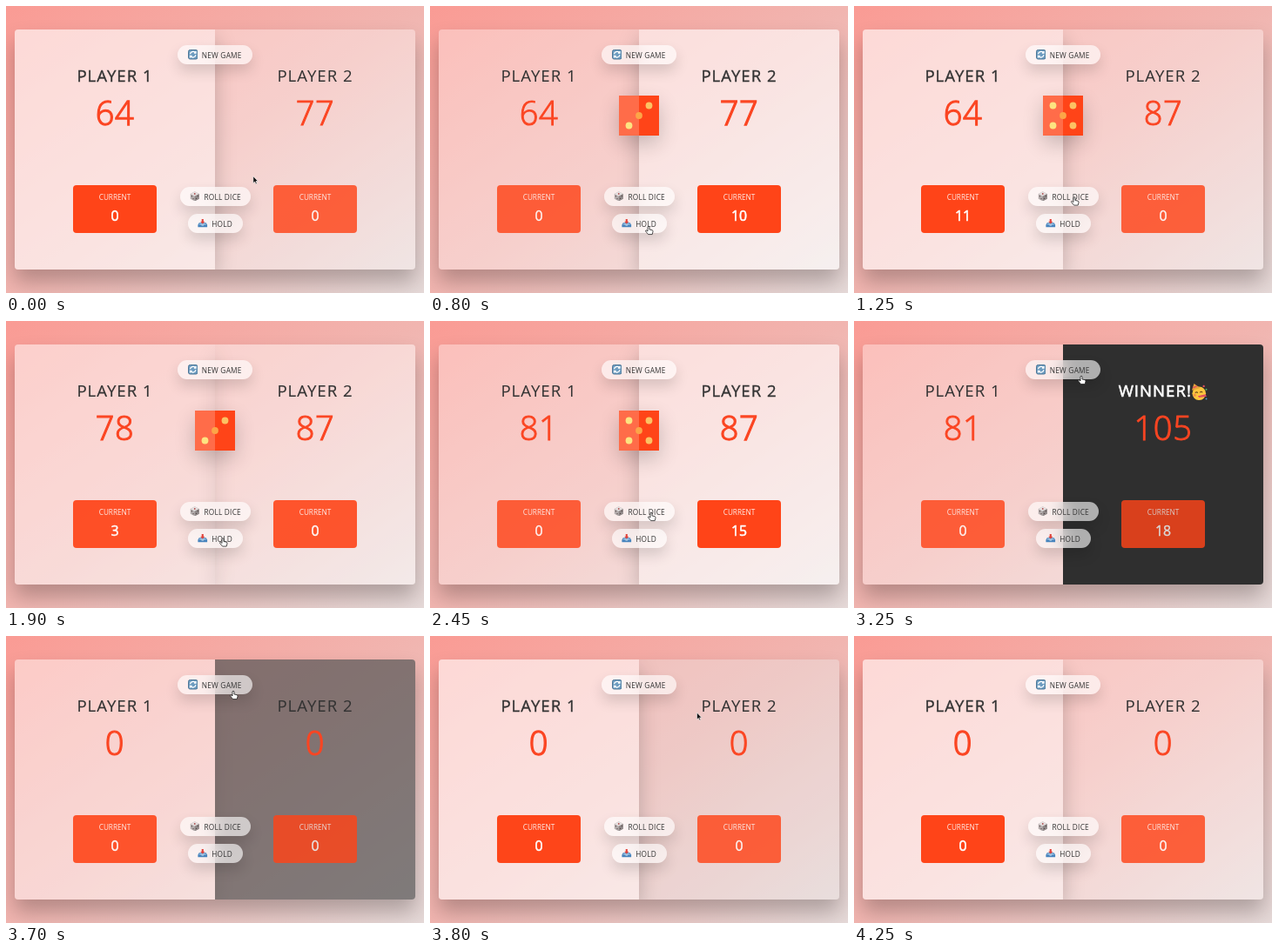
These frames come from a looping animation (480x330 px, 4300 ms). An HTML page:

```html
<!DOCTYPE html>
<html lang="en">
<head>
<meta charset="utf-8">
<title>Dice game</title>
<style>
html, body { margin: 0; width: 100%; height: 100%; overflow: hidden; }
body {
  position: relative;
  background: linear-gradient(to top left, #e6dad9, #f1b5b0 50%, #fa9b94);
  font-family: "Open Sans", "Noto Sans", sans-serif;
  color: #333;
}
div, .abs { position: absolute; box-sizing: border-box; white-space: nowrap; }
#board, #shade { left: 10px; top: 27px; width: 460px; height: 276px; border-radius: 4px; }
#board { overflow: hidden; background: rgba(255, 255, 255, .35); }
#shade { box-shadow: 0 14px 23px rgba(0, 0, 0, .25); }
.player { top: 0; width: 230px; height: 276px; text-align: center; }
.dark { inset: 0; background: #2f2f2f; }
.name, .score, .label, .value { left: 0; width: 100%; }
.name { top: 38px; line-height: 30px; font-size: 18.6px; letter-spacing: 1px; }
.name svg { width: 19.5px; height: 19.5px; margin-left: -1px; vertical-align: -4px; }
.score { top: 64.5px; line-height: 60px; font-size: 38px; letter-spacing: .6px; color: #fb4522; font-weight: 300; }
.box {
  left: 67px; top: 179px; width: 96px; height: 55px;
  border-radius: 4px; background: #ff4418; color: #fff;
}
.label { top: 4px; line-height: 20px; font-size: 8.2px; opacity: .9; }
.value { top: 20px; line-height: 30px; font-size: 15.8px; }
.btn {
  height: 22px; border-radius: 11px; line-height: 23.2px; font-size: 8.3px; letter-spacing: .22px;
  background: rgba(255, 255, 255, .62); backdrop-filter: blur(9px);
  box-shadow: 0 8px 16px rgba(0, 0, 0, .14);
}
.btn svg { position: absolute; left: 11.5px; top: 5px; width: 11.5px; height: 11.5px; }
.btn span { position: absolute; left: 27.6px; }
#die { left: 217px; top: 102.7px; width: 46px; height: 46px; box-shadow: 0 9px 23px rgba(0, 0, 0, .2); }
#cursor { left: 0; top: 0; overflow: visible; }
</style>
</head>
<body>
<div id="shade"></div>
<div id="board"></div>
<svg id="die" class="abs" viewBox="0 0 46 46"></svg>
<div class="btn" style="left:197.2px;top:45px;width:86px">
  <svg viewBox="0 0 12 12"><rect x=".5" y=".5" width="11" height="11" rx="2" fill="#6d9cc0" stroke="#4a7594"/>
    <path d="M2.7 5.5a3.4 3 0 0 1 6.3-1.5M9.3 6.5a3.4 3 0 0 1-6.3 1.5M9.4 2.2v2.2H7.2M2.6 9.8V7.6h2.2" fill="none" stroke="#fff" stroke-width="1.3"/></svg>
  <span>NEW GAME</span></div>
<div class="btn" style="left:199.8px;top:207.8px;width:81.2px">
  <svg viewBox="0 0 12 12"><path d="M6 .3l5.2 2.7v6.2L6 11.9.8 9.2V3z" fill="#b3acac"/>
    <path d="M6 .3L11.2 3 6 5.9.8 3z" fill="#e6e0e0"/><path d="M6 5.9L11.2 3v6.2L6 11.9z" fill="#8f8888"/>
    <g fill="#544"><circle cx="6" cy="3" r=".9" fill="#a44"/><circle cx="2.5" cy="5.9" r=".7"/><circle cx="4.2" cy="9" r=".7"/><circle cx="7.8" cy="8.8" r=".7"/><circle cx="9.7" cy="5.7" r=".7"/></g></svg>
  <span>ROLL DICE</span></div>
<div class="btn" style="left:208.6px;top:239.2px;width:63.4px">
  <svg viewBox="0 0 12 12"><path d="M1.8 5.6h8.4L11.6 8v2.8H.4V8z" fill="#4583bd"/><path d="M2.4 6.4h7.2l.8 1.4H8L7 9H5L4 7.8H1.6z" fill="#a9c8e2"/>
    <path d="M4.9 1h2.2v2.8h1.6L6 6.8 3.3 3.8h1.6z" fill="#e0413a"/></svg>
  <span>HOLD</span></div>
<svg id="cursor" class="abs" width="12" height="14">
  <path id="arrow" d="M0 0v8l1.9-1.6 1.2 2.7 1.3-.6L3.2 5.9h2.4z" fill="#111" stroke="#fff" stroke-width=".6"/>
  <path id="hand" d="M-1 .8Q0-.6 1 .8V4l3 .6q1.2.4 1 1.8L4.2 9.6h-4.6L-3.4 6q-.2-1.3 1-1.1L-1 6z" fill="#fff" stroke="#222" stroke-width=".8" stroke-linejoin="round"/>
</svg>
<script>
const LOOP = 4300, FADE = 200;
const $ = id => document.getElementById(id);
const lerp = (a, b, k) => a + (b - a) * k;

const FACE = `<svg viewBox="0 0 20 20"><circle cx="9.5" cy="11.5" r="8" fill="#fcc63d"/>
  <path d="M1 8L3.5 0 11 5z" fill="#e8a33a"/><path d="M2 5l5-2" stroke="#e04f5f" stroke-width="1.4"/>
  <path d="M5 11q1.5-2 3 0M10.5 10.5q1.5-2 3 0" fill="none" stroke="#5b3a1c" stroke-width="1.2"/>
  <circle cx="4.5" cy="13.5" r="1.6" fill="#f2924a"/><path d="M8 14.5l9-2 1.5 2.5-9 1.5z" fill="#e04f5f"/>
  <circle cx="15" cy="3" r="1.2" fill="#e04f5f"/><circle cx="18" cy="7" r="1" fill="#58b368"/><circle cx="18" cy="18" r="1" fill="#4a9bd4"/></svg>`;

// Time and move: a rolled number, H to hold, N for a new game
const MOVES = [
  [200, 4], [330, 1], [450, 5], [580, 2], [700, 3], [850, 'H'],
  [1010, 6], [1190, 5], [1340, 3], [1500, 'H'],
  [1650, 4], [1833, 1], [1870, 3], [1930, 'H'],
  [2080, 6], [2220, 4], [2370, 5], [2520, 3], [2707, 'H'], [3650, 'N']
];

// Cursor stops: time, x, y
const PATH = [
  [0, 284, 195.5], [180, 254, 219], [720, 254, 219], [790, 251, 253], [880, 251, 253],
  [970, 253, 219.5], [1380, 253, 219.5], [1460, 250, 250], [1530, 250, 250],
  [1610, 252, 219.5], [1870, 252, 219.5], [1898, 249, 249.5], [1950, 249, 249.5],
  [2030, 254, 220], [2590, 254, 220], [2670, 252, 250], [2720, 252, 250],
  [2800, 256, 220.5], [3060, 261, 63], [3740, 261, 63], [4050, 492, 190]
];

const players = [0, 1].map(i => {
  const el = document.createElement('div');
  el.className = 'player';
  el.style.left = i * 230 + 'px';
  el.innerHTML = '<div class="dark"></div><div class="name"></div><div class="score"></div>' +
    '<div class="box"><div class="label">CURRENT</div><div class="value"></div></div>';
  $('board').append(el);
  const part = c => el.querySelector('.' + c);
  return { el, dark: part('dark'), name: part('name'), score: part('score'), box: part('box'), value: part('value') };
});
const buttons = [...document.querySelectorAll('.btn')].map(b =>
  [b.offsetLeft, b.offsetTop, b.offsetWidth, b.offsetHeight]);

// The standard CSS "ease" curve
function ease(x) {
  if (x >= 1) return 1;
  let lo = 0, hi = 1, s;
  for (let i = 0; i < 20; i++) {
    s = (lo + hi) / 2;
    if (.75 * s * (1 - s) + s ** 3 < x) lo = s; else hi = s;
  }
  return .3 * s * (1 - s) ** 2 + 3 * s * s * (1 - s) + s ** 3;
}

const fader = v => ({ from: v, to: v, at: -FADE });
const level = (f, t) => lerp(f.from, f.to, ease((t - f.at) / FADE));
function fadeTo(f, to, t) {
  if (f.to !== to) Object.assign(f, { from: level(f, t), to, at: t });
}

function play(t) {
  const g = {
    score: [64, 77], cur: [0, 0], turn: 0, die: 0, winner: -1,
    active: [fader(1), fader(0)], won: [fader(0), fader(0)]
  };
  for (const [at, move] of MOVES) {
    if (at > t) break;
    const p = g.turn;
    let swap = false;
    if (move === 'N') {
      Object.assign(g, { score: [0, 0], cur: [0, 0], turn: 0, die: 0, winner: -1 });
    } else if (move === 'H') {
      g.score[p] += g.cur[p];
      if (g.score[p] >= 100) { g.winner = p; g.die = 0; }
      else swap = true;
    } else {
      g.die = move;
      g.cur[p] += move;
      swap = move === 1;
    }
    if (swap) { g.cur[p] = 0; g.turn = 1 - p; }
    for (const i of [0, 1]) {
      fadeTo(g.active[i], +(g.turn === i && g.winner < 0), at);
      fadeTo(g.won[i], +(g.winner === i), at);
    }
  }
  return g;
}

function drawDie(n) {
  const pips = [];
  if (n % 2) pips.push([1, 1]);
  if (n > 1) pips.push([0, 2], [2, 0]);
  if (n > 3) pips.push([0, 0], [2, 2]);
  if (n > 5) pips.push([0, 1], [2, 1]);
  $('die').style.display = n ? '' : 'none';
  $('die').innerHTML = '<path d="M0 0h46v46H0z" fill="#ff4418"/><path d="M0 0h23v46H0z" fill="#ff6c49"/>' +
    pips.map(([x, y]) => `<circle cx="${11.5 + x * 11.5}" cy="${11.5 + y * 11.5}" r="3.9" fill="${['#fde481', '#fca548', '#fcc263'][x]}"/>`).join('');
}

function drawCursor(t) {
  let i = PATH.findIndex(p => p[0] > t);
  if (i < 0) i = PATH.length - 1;
  const [t0, x0, y0] = PATH[i - 1], [t1, x1, y1] = PATH[i];
  const k = Math.min(1, (t - t0) / (t1 - t0));
  const x = lerp(x0, x1, k), y = lerp(y0, y1, k);
  const over = buttons.some(([l, top, w, h]) => x > l && x < l + w && y > top && y < top + h);
  $('cursor').style.transform = `translate(${x}px, ${y}px)`;
  $('hand').style.display = over ? '' : 'none';
  $('arrow').style.display = over ? 'none' : '';
}

const stroke = (el, w) => { el.style.webkitTextStroke = w + 'px'; };

let shown = '';
function draw(t) {
  const g = play(t);
  const key = [g.score, g.cur, g.winner, g.die].join();
  players.forEach((p, i) => {
    const a = level(g.active[i], t), won = g.winner === i;
    p.el.style.background = `rgba(255,255,255,${.4 * a})`;
    p.el.style.boxShadow = `0 9px 23px rgba(0,0,0,${.22 * a})`;
    p.dark.style.opacity = level(g.won[i], t);
    p.box.style.opacity = .82 + .18 * a;
    stroke(p.name, won ? .6 : .05 + .3 * a);
    stroke(p.score, 1 + .3 * a);
    stroke(p.value, .4 + .2 * a);
    if (key !== shown) {
      p.name.innerHTML = won ? 'WINNER!' + FACE : 'PLAYER ' + (i + 1);
      p.name.style.color = won ? '#fff' : '';
      p.score.textContent = g.score[i];
      p.value.textContent = g.cur[i];
    }
  });
  if (key !== shown) drawDie(g.die);
  shown = key;
  drawCursor(t);
}

function tick() {
  draw(performance.now() % LOOP);
  requestAnimationFrame(tick);
}
tick();
</script>
</body>
</html>
```
